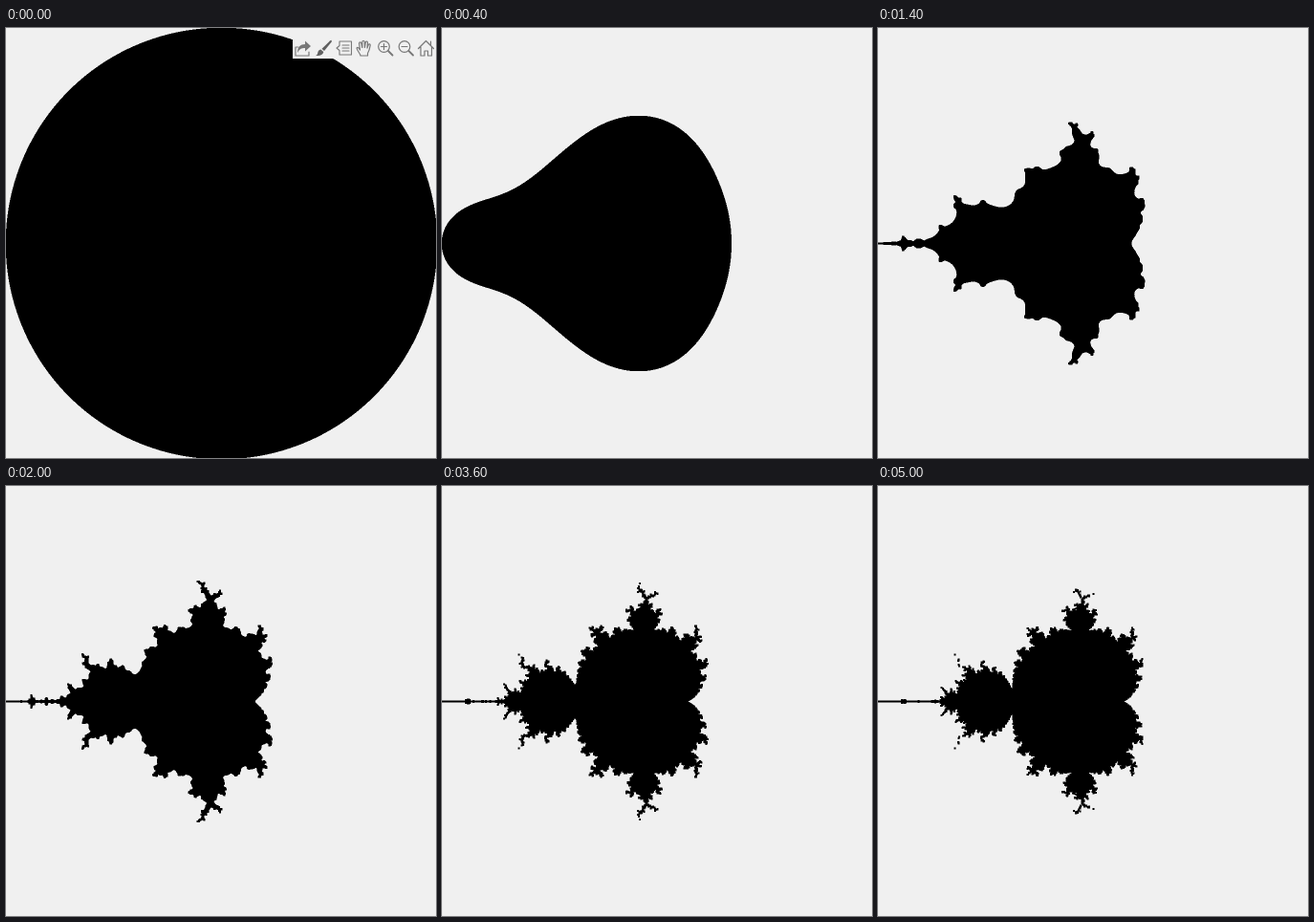
An HTML page with a canvas that plays this animation: 450x450 px, repeating every 5200 ms.

```html
<!DOCTYPE html>
<html lang="en">
<head>
<meta charset="utf-8">
<title>Mandelbrot iterations</title>
<style>
  html, body { margin: 0; width: 100%; height: 100%; overflow: hidden; background: #f0f0f0; }
  canvas, svg { position: absolute; left: 0; top: 0; width: 450px; height: 450px; }
</style>
</head>
<body>
<canvas id="set" width="450" height="450"></canvas>
<svg id="tools" viewBox="0 0 450 450" fill="none" stroke="#787878" stroke-width="1.2" stroke-linecap="round" stroke-linejoin="round">
  <rect x="300" y="10" width="150" height="22" fill="#f0f0f0" stroke="none"/>
  <!-- export -->
  <path d="M306 20h-3v9h14v-4"/>
  <path d="M305 26c0-6 3-9 8-9v-3.500l6 5.500-6 5.500v-3.500c-4 0-6 1-8 5z" fill="#787878" stroke="none"/>
  <!-- brush -->
  <path d="M340.500 13c1 1 0 2-1 3l-6.500 8-2.500-2.200 7.500-7.300c1-1 2-2 2.500-1.500zM329.500 22.500l2.800 2.500c-.5 3-4 4.500-8.300 4 2-1 2-2 2.500-4 .5-1.500 1.600-2.500 3-2.500z" fill="#606060" stroke="none"/>
  <!-- data tip -->
  <path d="M349 14h12.500v14H349v-4.500l-3-2.500 3-2.500zM352 18h7M352 21h7M352 24h7" stroke-width="1.100"/>
  <!-- pan -->
  <path d="M371 29c0-2-3.500-5-4-8 1-1.500 2.500 0 3.500 2l-1-7c.3-1.700 2-1.500 2.300 0l1 4.500v-6c.3-1.700 2.200-1.700 2.400 0l.2 6 .9-5.500c.5-1.500 2.200-1.200 2.200.4l-.5 5.600 1.200-3.500c.7-1.300 2.200-.6 2 .7-.7 4.500-1.600 6.500-2.700 8.300v2.500z"/>
  <g id="zoom">
    <circle cx="395.500" cy="19.500" r="5.800"/>
    <path d="M400 24l4.500 4.500" stroke-width="1.800"/>
    <path d="M392.500 19.500h6"/>
  </g>
  <use href="#zoom" x="21.500"/>
  <path d="M395.500 16.500v6"/>
  <!-- home -->
  <path d="M431.500 21.500l8-8 8 8M434 20v9h4v-5h3.500v5h4v-9M444.500 18v-4"/>
</svg>
<script>
  const SIZE = 450, STEP = 200, FRAMES = 26;
  const SUB = SIZE * 2;       // half-pixel cells
  const DOT = 4;              // width of a plotted dot, in cells
  const GRID = SUB + DOT - 1; // sample points, half a pixel apart
  const CENTRE = 225.5, SCALE = SIZE / 4;
  const ctx = document.getElementById('set').getContext('2d');
  const tools = document.getElementById('tools');
  const image = ctx.createImageData(SIZE, SIZE);
  const pixels = new Uint32Array(image.data.buffer);
  const shades = [240, 180, 120, 60, 0].map(v => (0xff000000 | v * 0x10101) >>> 0);

  // Number of iterates that stay within radius 2
  function lifetime(cx, cy) {
    let x = 0, y = 0;
    for (let n = 0; n < FRAMES; n++) {
      const next = x * x - y * y + cx;
      y = 2 * x * y + cy;
      x = next;
      if (x * x + y * y > 4) return n;
    }
    return FRAMES;
  }

  // Each cell takes the longest life among the dots that cover it
  function spread(src, width, height, stride, srcWidth) {
    const out = new Uint8Array(width * height);
    for (let y = 0; y < height; y++) {
      for (let x = 0; x < width; x++) {
        let best = 0;
        for (let k = 0; k < DOT; k++) {
          best = Math.max(best, src[y * srcWidth + x + k * stride]);
        }
        out[y * width + x] = best;
      }
    }
    return out;
  }

  const coord = j => ((j - 1) / 2 - CENTRE) / SCALE;
  const samples = Uint8Array.from({ length: GRID * GRID },
    (_, i) => lifetime(coord(i % GRID), coord(Math.floor(i / GRID))));
  const rows = spread(samples, SUB, GRID, 1, GRID);
  const life = spread(rows, SUB, SUB, SUB, SUB);

  let shown = -1;
  function draw(time) {
    const step = Math.floor(time / STEP) % FRAMES;
    if (step === shown) return;
    shown = step;
    for (let y = 0, p = 0; y < SIZE; y++) {
      for (let x = 0; x < SIZE; x++, p++) {
        const i = 2 * y * SUB + 2 * x;
        const cover = (life[i] > step) + (life[i + 1] > step) +
          (life[i + SUB] > step) + (life[i + SUB + 1] > step);
        pixels[p] = shades[cover];
      }
    }
    ctx.putImageData(image, 0, 0);
    tools.style.display = step ? 'none' : '';
  }

  const start = performance.now();
  function tick() {
    draw(performance.now() - start);
    requestAnimationFrame(tick);
  }
  tick();
</script>
</body>
</html>
```
